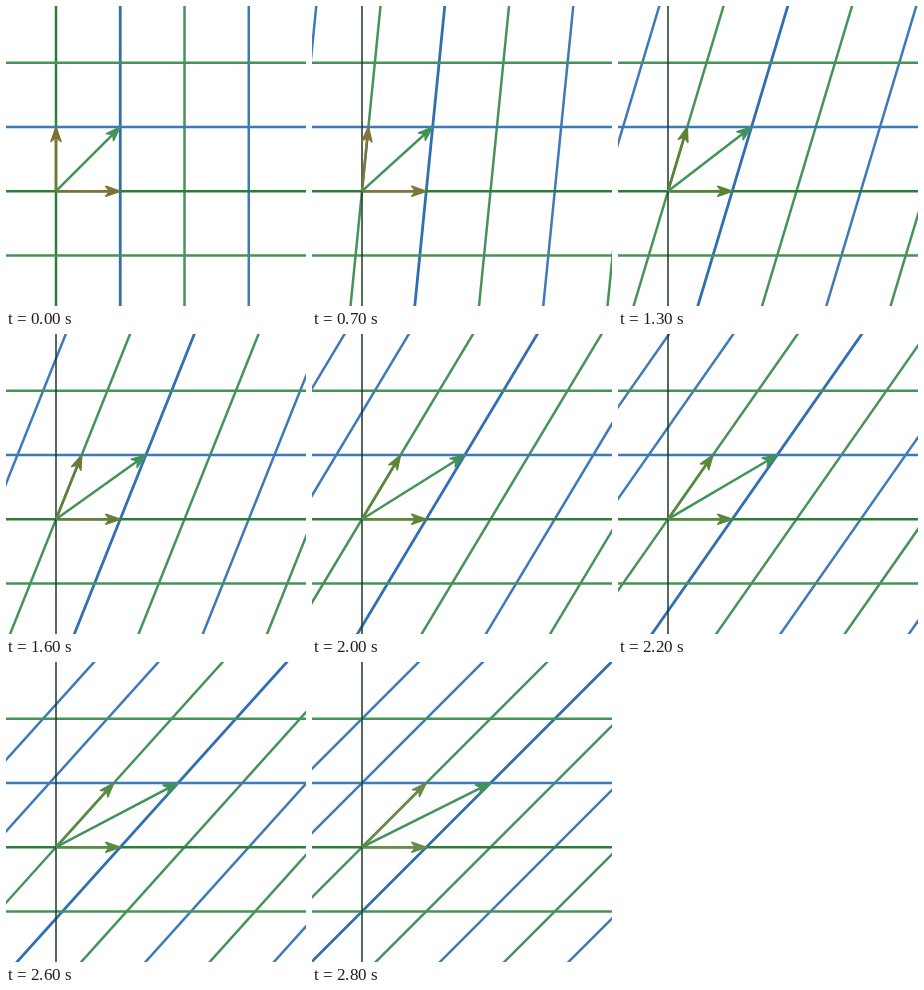
An HTML page with a canvas that plays this animation: 300 px wide and 300 px high, repeating every 3.6 s.

```html
<!DOCTYPE html>
<html>
<head>
<meta charset="utf-8">
<style>
html, body { margin: 0; height: 100%; overflow: hidden; background: #fff; }
canvas { display: block; }
</style>
</head>
<body>
<canvas id="stage" width="300" height="300"></canvas>
<script>
const ctx = document.getElementById('stage').getContext('2d');
const LOOP = 3600, UNIT = 64.25, OX = 50, OY = 185.2;
const GREEN = '#469359', DEEP_GREEN = '#2d7c37', BLUE = '#3f7ab8', DEEP_BLUE = '#306fb2';
const STEPS = [700, 1000, 1300, 1600, 1800, 2000, 2200, 2400, 2600, 2800];
const BASIS = ['#7d7337', '#80763a', '#707b38', '#5d8137', '#677d3b', '#64823a',
               '#5f8638', '#56893c', '#4b8d40', '#598b44', '#698a4b'];

function line(x1, y1, x2, y2, color, width = 2.5) {
  ctx.strokeStyle = color;
  ctx.lineWidth = width;
  ctx.beginPath();
  ctx.moveTo(x1, y1);
  ctx.lineTo(x2, y2);
  ctx.stroke();
}

// Arrow from the grid origin to grid point (u, v)
function arrow(u, v, color) {
  const dx = u * UNIT, dy = -v * UNIT, length = Math.hypot(dx, dy);
  ctx.save();
  ctx.translate(OX, OY);
  ctx.rotate(Math.atan2(dy, dx));
  line(0, 0, length - 3, 0, color);
  ctx.fillStyle = color;
  ctx.lineWidth = 1.5;
  ctx.beginPath();
  ctx.moveTo(length, 0);
  ctx.lineTo(length - 14.5, -5);
  ctx.lineTo(length - 10.5, 0);
  ctx.lineTo(length - 14.5, 5);
  ctx.closePath();
  ctx.fill();
  ctx.stroke();
  ctx.restore();
}

function draw(time) {
  const step = STEPS.filter(t => time >= t).length;
  const shear = step / 10;
  ctx.fillStyle = '#fff';
  ctx.fillRect(0, 0, 300, 300);
  ctx.lineJoin = 'round';

  for (let k = -2; k <= 5; k++) {
    const x = OX + k * UNIT;
    const color = k === 1 ? DEEP_BLUE
      : k === 0 && !step ? DEEP_GREEN
      : k === -2 || k % 2 ? BLUE : GREEN;
    line(x + shear * (OY + 10), -10, x + shear * (OY - 310), 310, color, k === 1 ? 2.8 : 2.5);
  }
  for (let j = -1; j <= 2; j++) {
    const y = OY - j * UNIT;
    line(0, y, 300, y, j === 0 ? DEEP_GREEN : j === 1 ? BLUE : GREEN);
  }
  if (step) line(OX, 0, OX, 300, '#1b3825', 1.5);

  arrow(1, 0, BASIS[step]);
  arrow(shear, 1, BASIS[step]);
  arrow(1 + shear, 1, '#429358');
}

const start = performance.now();
function tick() {
  draw((performance.now() - start) % LOOP);
  requestAnimationFrame(tick);
}
tick();
</script>
</body>
</html>
```
